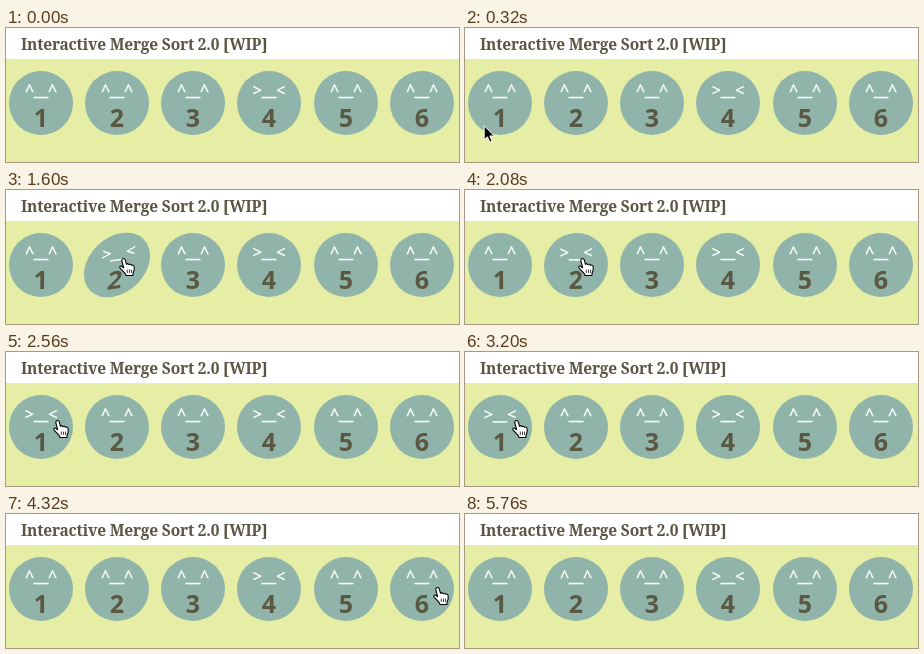
Recreate the animation shown at these times as an HTML page. Size 453 by 134 pixels, loop 6.88 s.

```html
<!DOCTYPE html>
<html lang="en">
<head>
<meta charset="utf-8">
<title>Interactive Merge Sort</title>
<style>
  html, body { margin: 0; width: 100%; height: 100%; overflow: hidden; background: #fff; }
  svg { display: block; width: 453px; height: 134px; }
  .title { font: bold 15.5px "Noto Serif", serif; letter-spacing: -.19px; fill: #5a5544; }
  .face { font: 16px "Open Sans", sans-serif; fill: #fff; stroke: #fff; stroke-width: .4; text-anchor: middle; }
  .digit { font: bold 25px "Open Sans", sans-serif; fill: #5a5843; text-anchor: middle; }
</style>
</head>
<body>
<svg viewBox="0 0 453 134">
  <rect width="453" height="134" fill="#fff"/>
  <rect y="31" width="453" height="103" fill="#e6eda5"/>
  <text class="title" x="15" y="22">Interactive Merge Sort 2.0 [WIP]</text>
  <g id="balls"></g>
  <path id="arrow" d="M0 0V14.2L3.3 11.2 5.6 16.5 7.9 15.5 5.7 10.3H10.2Z"
    fill="#000" stroke="#fff" stroke-width="1"/>
  <g id="hand">
    <g transform="scale(1.1)" stroke="#000" stroke-width="1" stroke-linejoin="round">
      <path fill="#fff" d="M3.2 1.6C4.2 .4 5.6 .8 6 2L7.2 6.2C7.8 5.3 9.2 5.4 9.5 6.6
        C10.2 5.8 11.5 6 11.8 7.1C12.6 6.6 13.9 7 14.1 8.2C14.6 10.5 14.3 11.8 13.2 14
        L13 16.3H6.6L6.2 14.8C4.6 13.2 3 11.3 1.4 9.6C.5 8.5 1.6 7.3 2.8 8L4.6 9.3 3 3.2
        C2.9 2.6 2.9 2 3.2 1.6Z"/>
      <path fill="none" stroke-width=".7" d="M7.9 11v3M9.9 11v3M11.8 11v3"/>
    </g>
  </g>
</svg>
<script>
const LOOP = 6880, STEP = 160, WOBBLE = 1000;
const RADIUS = 32, MID_Y = 75;
const HAPPY = '^__^', SQUINT = '>__<';
const clicks = { 2: 1420, 1: 2480 };

// Pointer tip: [time, x, y]
const path = [
  [160, 4, 100], [800, 101, 85], [1120, 117, 69], [2080, 117, 69],
  [2400, 51, 69], [3360, 51, 69], [4320, 431, 74], [5760, 431, 74]
];

const $ = id => document.getElementById(id);
const ease = u => u * u * (3 - 2 * u);

function add(parent, tag, attrs, text = '') {
  const node = document.createElementNS('http://www.w3.org/2000/svg', tag);
  for (const key in attrs) node.setAttribute(key, attrs[key]);
  node.textContent = text;
  return parent.appendChild(node);
}

const balls = [1, 2, 3, 4, 5, 6].map(n => {
  const x = 35 + Math.floor((n - 1) * 76.25);
  const group = add($('balls'), 'g', {});
  add(group, 'circle', { r: RADIUS, fill: '#90b4a9' });
  const face = add(group, 'text', { class: 'face', y: -7 }, HAPPY);
  add(group, 'text', { class: 'digit', y: 24 }, n);
  return { n, x, group, face };
});

// Skew alternates in sign and halves at every ninth of the wobble
function skewAt(p) {
  const key = i => i < 2 || i > 8 ? 0 : -12.5 * (-0.5) ** (i - 2);
  const i = Math.floor(p * 9);
  return key(i) + (key(i + 1) - key(i)) * ease(p * 9 - i);
}

function pointerAt(t) {
  const i = path.findIndex(k => k[0] > t);
  if (i < 1) return null;
  const [t0, x0, y0] = path[i - 1], [t1, x1, y1] = path[i];
  const u = ease((t - t0) / (t1 - t0));
  return { x: x0 + (x1 - x0) * u, y: y0 + (y1 - y0) * u };
}

function place(node, shown, x, y) {
  node.style.display = shown ? '' : 'none';
  node.setAttribute('transform', `translate(${x} ${y})`);
}

function draw(time) {
  const t = Math.floor(time % LOOP / STEP) * STEP;

  for (const { n, x, group, face } of balls) {
    const p = (t - clicks[n]) / WOBBLE;
    const active = p >= 0 && p < 1;
    const skew = active ? skewAt(p) : 0;
    face.textContent = active || n === 4 ? SQUINT : HAPPY;
    group.setAttribute('transform',
      `translate(${x} ${MID_Y}) skewX(${skew}) skewY(${skew})`);
  }

  const tip = pointerAt(t) || { x: 0, y: 0 };
  const shown = pointerAt(t) !== null;
  const over = t > 800 &&
    balls.some(b => Math.hypot(tip.x - b.x, tip.y - MID_Y) < RADIUS);
  place($('arrow'), shown && !over, tip.x, tip.y);
  place($('hand'), shown && over, tip.x - 4.4, tip.y - 1.5);
}

const start = performance.now();
function tick() {
  draw(performance.now() - start);
  requestAnimationFrame(tick);
}
tick();
</script>
</body>
</html>
```
